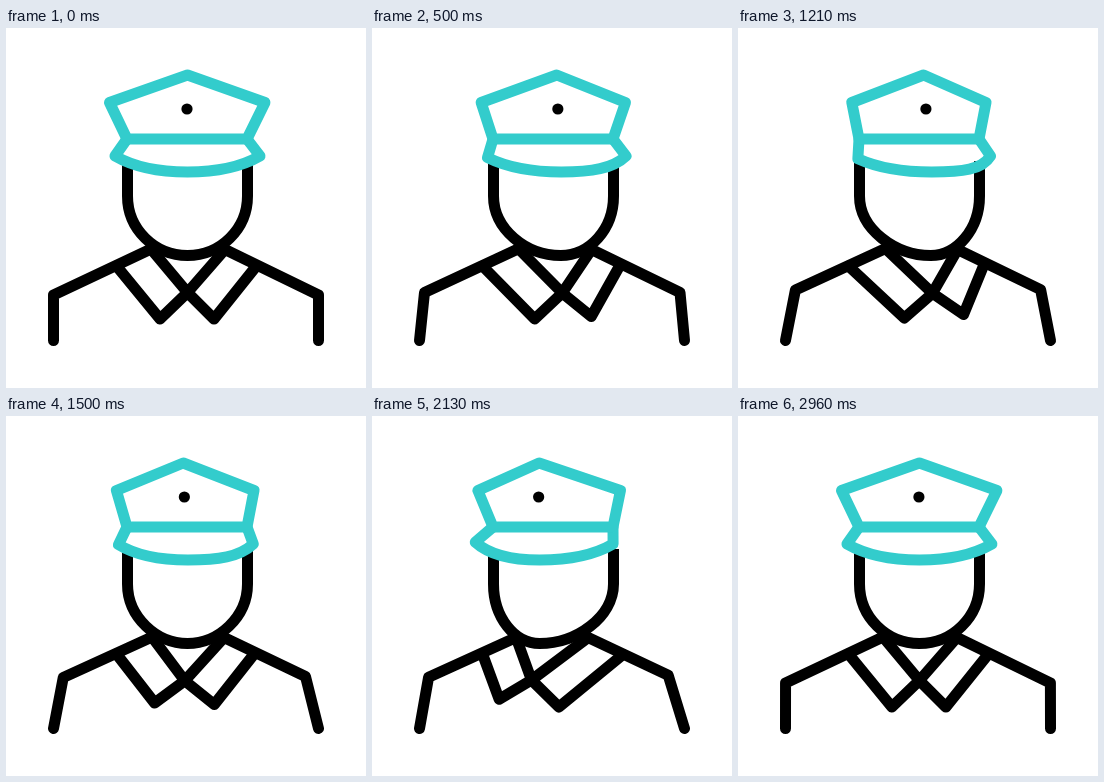
An HTML page that plays this animation: 360x360 px, repeating every 3000 ms.

```html
<!DOCTYPE html>
<html lang="en">
<head>
<meta charset="utf-8">
<title>Officer turning</title>
<style>
  html, body { margin: 0; width: 100%; height: 100%; overflow: hidden; background: #fff; }
  svg { display: block; width: 100%; height: 100%; }
  path { fill: none; stroke: #000; stroke-width: 11; stroke-linejoin: round; stroke-linecap: round; }
  .cap { stroke: #33cccc; }
  #head { stroke-linecap: butt; }
</style>
</head>
<body>
<svg viewBox="0 0 360 360">
  <path id="head"/>
  <path id="shoulders"/>
  <path id="collar"/>
  <path id="visor" class="cap"/>
  <path id="crown" class="cap"/>
  <circle id="badge" cy="81" r="5.6"/>
</svg>
<script>
const LOOP = 3000, FPS = 24, TURN = 1000;
const el = id => document.getElementById(id);
const ease = p => p * p * (3 - 2 * p);

// Poses in order: facing front, right, left, then front again.
function draw(time) {
  const frame = Math.floor((time % LOOP + 4) * FPS / 1000);
  const t = frame * 1000 / FPS % LOOP;
  const leg = Math.floor(t / TURN + 1e-6);
  const p = ease(Math.max(0, t / TURN - leg));
  const mix = (...poses) => {
    const from = poses[leg], to = poses[(leg + 1) % 3];
    return (from + (to - from) * p).toFixed(2);
  };
  const set = (id, d) => el(id).setAttribute('d', d);

  const chin = mix(181.5, 196, 167);
  set('head', `M121.5 133V168
    C121.5 201 ${mix(148.5, 159, 142)} 227.5 ${chin} 227.5
    S241.5 201 241.5 168V133`.replace('S', `C${mix(214.5, 221, 204)} 227.5 `));

  const neckL = `${mix(145, 148, 144)} ${mix(221, 220.5, 221.5)}`;
  const neckR = `${mix(219, 220, 216)} 221.5`;
  set('shoulders', `M47.5 312.5L${mix(47.5, 57.5, 57)} ${mix(267, 262, 261)}L${neckL}
    M312.5 312.5L${mix(312.5, 303.5, 295.5)} ${mix(267, 262, 259)}L${neckR}`);

  const cross = `${mix(181.5, 199, 158.5)} ${mix(264.5, 265.5, 264)}`;
  set('collar', `M110.5 238L${mix(154, 171.3, 126)} ${mix(291, 291, 283)}L${cross}L${neckR}
    M${neckL}L${cross}L${mix(208, 230.5, 186)} ${mix(291, 286, 291)}
    L${mix(250, 244.5, 251)} 238.5`);

  set('visor', `M121 111L${mix(109, 122, 103)} ${mix(128, 131.3, 126)}
    C${mix(128, 143, 117)} ${mix(139, 140, 139)} ${mix(152, 168, 140)} 144 ${mix(181.5, 197, 167)} 144
    C${mix(211, 228, 196)} 144 ${mix(235, 247, 220)} ${mix(139, 142, 140)} ${mix(254, 254, 240.5)} 128
    L241 111`);

  set('crown', `M${mix(181.5, 188, 166.5)} 47L${mix(259, 248, 248)} 74.5L241 111H121
    L${mix(103.5, 114.8, 106)} 74.5Z`);

  el('badge').setAttribute('cx', mix(181, 190.7, 166));
}

const start = performance.now();
function tick() {
  draw(performance.now() - start);
  requestAnimationFrame(tick);
}
tick();
</script>
</body>
</html>
```
